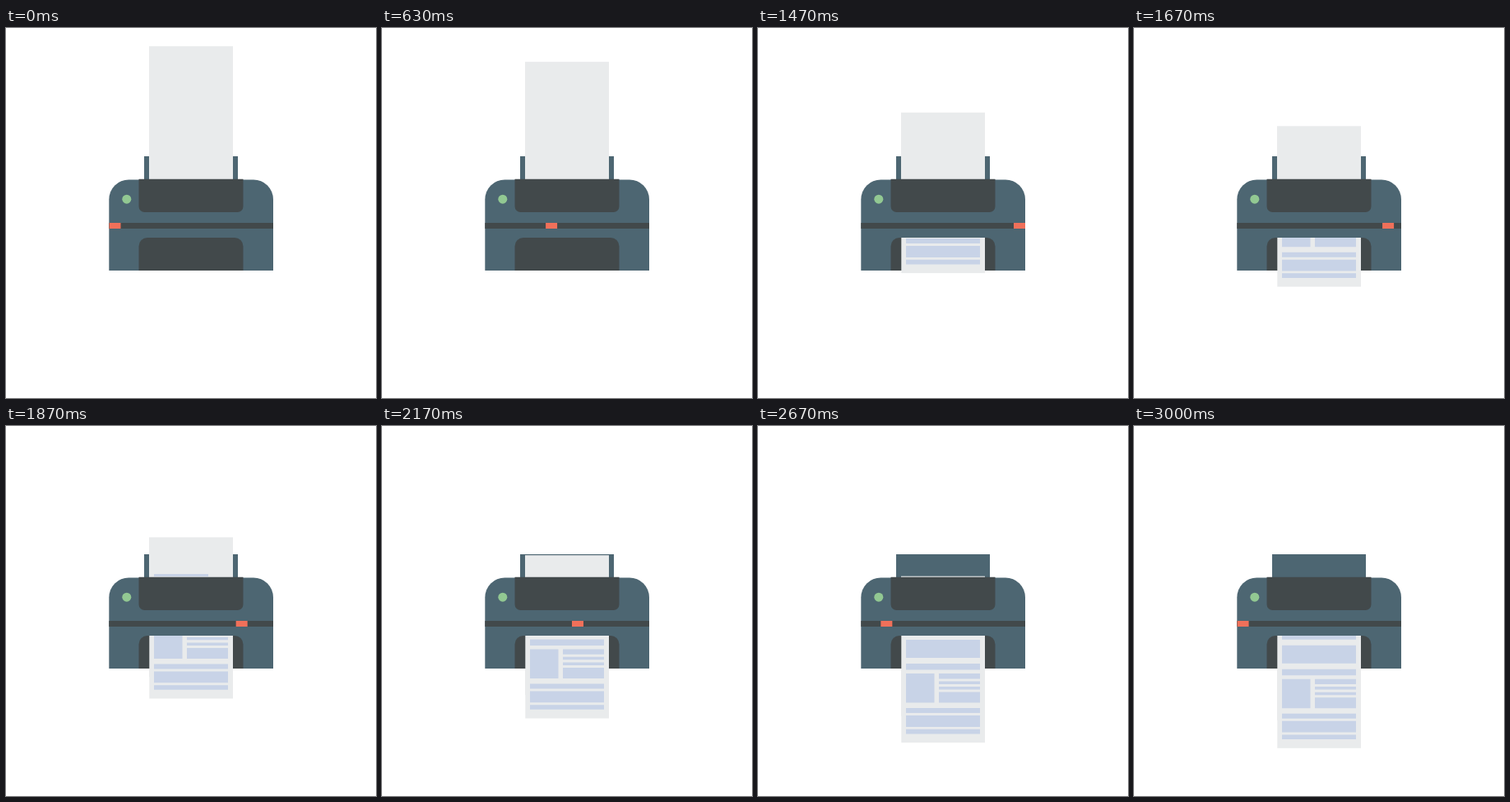
Recreate the animation shown at these times as an HTML page. Size 450x450 px, loop 3030 ms.

```html
<!DOCTYPE html>
<html lang="en">
<head>
<meta charset="utf-8">
<title>Printer</title>
<style>
html, body { margin: 0; width: 100%; height: 100%; overflow: hidden; background: #fff; }
svg { display: block; width: 100%; height: 100%; }
.case { fill: #4d6672; }
.dark { fill: #42494b; }
.paper { fill: #e9ebec; }
.ink { fill: #c8d3e7; }
</style>
</head>
<body>
<svg viewBox="0 0 450 450">
  <defs>
    <clipPath id="exit"><rect x="160" y="255" width="130" height="195"/></clipPath>
    <!-- Printed page, measured upward from its bottom edge -->
    <path id="print" d="M180-151.5h66v3h-66z M180-139h90v7h-90z M180-125h90v22h-90z
      M180-96h90v7.5h-90z M180-84h34.5v35.5h-34.5z M220-84h50v6.3h-50z M220-74.7h50v3.5h-50z
      M220-68h50v3.5h-50z M220-61.5h50v13h-50z M180-42h90v6h-90z M180-33h90v13.8h-90z
      M180-16.3h90v5.6h-90z"/>
  </defs>
  <rect class="case" x="168" y="156" width="114" height="30"/>
  <rect class="paper" id="feed" x="174" width="102" height="170"/>
  <use class="ink" id="back" href="#print"/>
  <path class="case" d="M125.3 295V208.500a24 24 0 0 1 24-24H301a24 24 0 0 1 24 24V295z"/>
  <path class="dark" d="M161.500 183.700h127V217a7 7 0 0 1-7 7h-113a7 7 0 0 1-7-7z"/>
  <path class="dark" d="M161.500 295V265.500a10.500 10.500 0 0 1 10.500-10.500H278a10.500 10.500 0 0 1 10.500 10.500V295z"/>
  <rect class="dark" x="125.300" y="237" width="199.700" height="7"/>
  <rect id="head" y="237" width="14" height="7" fill="#f0705a"/>
  <circle cx="146.800" cy="208.200" r="5.500" fill="#92c892"/>
  <g clip-path="url(#exit)">
    <g id="sheet">
      <rect class="paper" x="174.300" y="-190" width="101.700" height="190"/>
      <use class="ink" href="#print"/>
    </g>
  </g>
</svg>
<script>
const LOOP = 3030;
const get = id => document.getElementById(id);
const [feed, back, head, sheet] = ['feed', 'back', 'head', 'sheet'].map(get);

// Eased progress from 0 to 1 between two times
function ease(t, start, end) {
  const p = Math.min(1, Math.max(0, (t - start) / (end - start)));
  return p * p * (3 - 2 * p);
}

function draw(now) {
  const t = now % LOOP;
  const shift = `translate(0 ${250.8 + 141 * ease(t, 500, 3000)})`;
  feed.setAttribute('y', 22.2 + 166 * ease(t, 0, 3000));
  sheet.setAttribute('transform', shift);
  back.setAttribute('transform', shift);
  back.setAttribute('visibility', t < 1750 ? 'hidden' : 'visible');
  head.setAttribute('x', 125.5 + 185.5 * (ease(t, 0, 1465) - ease(t, 1465, 3020)));
  requestAnimationFrame(draw);
}

draw(0);
</script>
</body>
</html>
```
